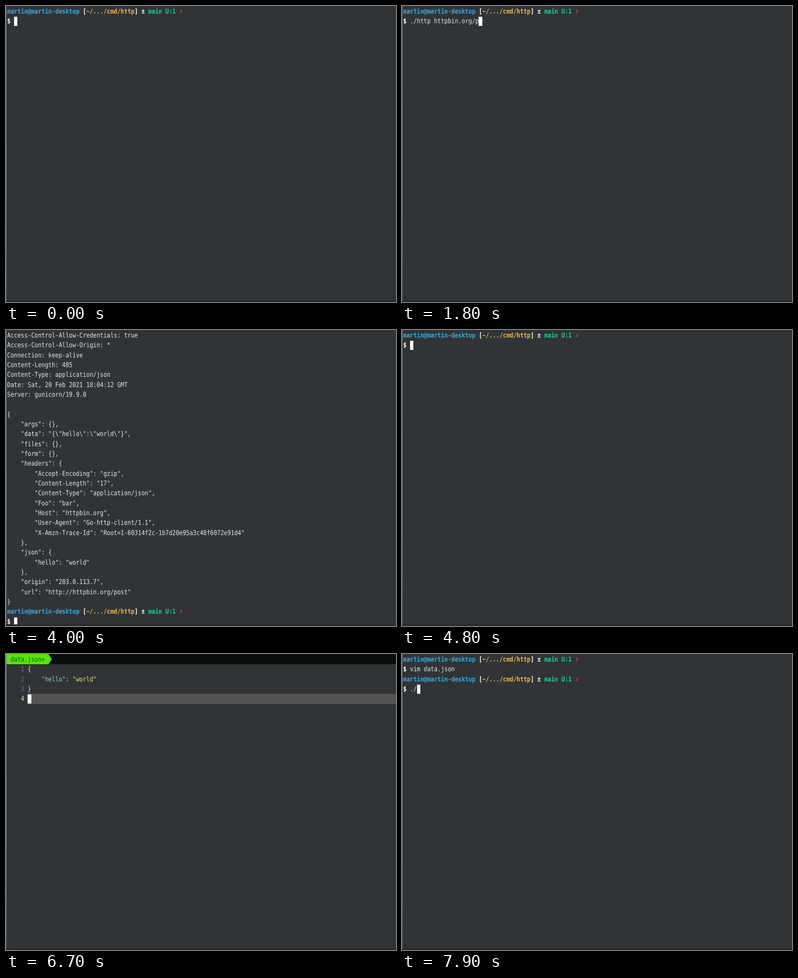
Recreate the animation shown at these times as an HTML page. Size 723 by 550 pixels, loop 8 s.

```html
<!DOCTYPE html>
<html lang="en">
<head>
<meta charset="utf-8">
<title>Terminal</title>
<style>
  html, body { margin: 0; width: 100%; height: 100%; overflow: hidden; background: #303437; }
  #stage { position: absolute; left: 0; top: 0; width: 723px; height: 550px; overflow: hidden; background: #303437; }
  #stage > * { position: absolute; }
  #edge { left: 0; top: 0; width: 1px; height: 550px; background: linear-gradient(#66767a, #74898a 60%, #5f686b); }
  #foot { left: 0; top: 547px; width: 723px; height: 3px; background: #25282b; }
  #bar { left: 0; top: 0; width: 723px; height: 19.3px; background: #0b0d0d; }
  #tab { left: 1px; top: 0; height: 19.3px; background: #5ae20c;
    clip-path: polygon(0 0, calc(100% - 6.4px) 0, 100% 50%, calc(100% - 6.4px) 100%, 0 100%); }
  #line { left: 40.3px; width: 683px; height: 18.33px; background: #545454; }
  #cursor { width: 6.4px; height: 17px; background: #fff; }
  /* cells are 6.38 x 18.33 px */
  #text { left: 2px; top: 1px; margin: 0; transform: scaleX(.848); transform-origin: 0 0;
    font: 12.5px/18.333px "DejaVu Sans Mono", monospace; white-space: pre; color: #e6e8e8;
    text-rendering: geometricPrecision; font-variant-ligatures: none; }
  b { color: #fff; }
  .user { color: #3ba9e0; }
  .path { color: #f2b548; }
  .git { color: #1fcf96; }
  .bad { color: #d8412f; }
  .tabname { color: #0c5a08; }
  .num { color: #6d6ca8; }
  .here { color: #eee67c; }
  .key { color: #84d2ea; }
  .str { color: #e8e08a; }
  .under { color: #303437; }
  .tilde { color: #454a4e; }
</style>
</head>
<body>
<div id="stage">
  <div id="bar"></div>
  <div id="tab"></div>
  <div id="line"></div>
  <div id="cursor"></div>
  <pre id="text"></pre>
  <div id="edge"></div>
  <div id="foot"></div>
</div>
<script>
const LOOP = 8000, CW = 6.38, RH = 550 / 30, ROWS = 30;
const el = id => document.getElementById(id);
const span = (cls, s) => `<span class="${cls}">${s}</span>`;
const bold = (cls, s) => `<b class="${cls}">${s}</b>`;

const prompt = bold("user", "martin@martin-desktop") + " <b>[</b>" + bold("path", "~/.../cmd/http") +
  "<b>] ±</b> " + bold("git", "main U:1") + " " + bold("bad", "✗");
const shell = s => "<b>$</b> " + s;

const post = "./http httpbin.org/post hello=world foo:bar";
const edit = "vim data.json";

// [time, characters typed]
const postKeys = [[0, 0], [200, 1], [400, 2], [500, 4], [600, 5], [700, 6], [800, 7], [900, 9],
  [1000, 11], [1100, 13], [1200, 15], [1500, 16], [1600, 17], [1700, 19], [1800, 20], [1900, 21],
  [2000, 23], [2200, 24], [2300, 26], [2400, 28], [2500, 29], [2600, 31], [2700, 33], [2800, 35],
  [3000, 36], [3100, 37], [3200, 39], [3300, 40], [3400, 41], [3500, 42], [3600, 43]];
const editKeys = [[0, 0], [5000, 1], [5100, 2], [5200, 3], [5300, 4], [5400, 5], [5500, 6],
  [5600, 7], [5700, 9], [5800, 10], [5900, 12], [6000, 13]];
const runKeys = [[0, 0], [7800, 1], [7900, 2]];
const typed = (keys, s, t) => s.slice(0, keys.filter(k => k[0] <= t).pop()[1]);

const reply = `HTTP/1.1 200 OK
Access-Control-Allow-Credentials: true
Access-Control-Allow-Origin: *
Connection: keep-alive
Content-Length: 485
Content-Type: application/json
Date: Sat, 20 Feb 2021 18:04:12 GMT
Server: gunicorn/19.9.0

{
    "args": {},
    "data": "{\\"hello\\":\\"world\\"}",
    "files": {},
    "form": {},
    "headers": {
        "Accept-Encoding": "gzip",
        "Content-Length": "17",
        "Content-Type": "application/json",
        "Foo": "bar",
        "Host": "httpbin.org",
        "User-Agent": "Go-http-client/1.1",
        "X-Amzn-Trace-Id": "Root=1-60314f2c-1b7d20e95a3c48f6072e91d4"
    },
    "json": {
        "hello": "world"
    },
    "origin": "203.0.113.7",
    "url": "http://httpbin.org/post"
}`.split("\n");

// Shell screen: earlier lines, then the prompt with the text being typed
function term(before, s) {
  const lines = [...before, prompt, shell(s)].slice(-ROWS);
  return { lines, row: lines.length - 1, col: 2 + s.length };
}

function vim(name, body, row) {
  const lines = [" " + span("tabname", name)];
  body.forEach((s, i) => lines.push("    " + span(i + 1 === row ? "here" : "num", i + 1) + " " + s));
  while (lines.length < ROWS) lines.push(span("tilde", "~"));
  return { lines, row, col: 6, tab: name.length + 3 };
}

const pair = "    " + span("key", '"hello"') + ": " + span("str", '"world"');

function screen(t) {
  if (t < 3800) return term([], typed(postKeys, post, t));
  if (t < 3900) return { lines: [prompt, shell(post)], row: 2, col: 0 };
  if (t < 4700) return term([prompt, shell(post), ...reply], "");
  if (t < 6300) return term([], typed(editKeys, edit, t));
  if (t < 6400) return { lines: [], row: 0, col: 0 };
  if (t < 6700) return vim("data.json", [""], 1);
  if (t < 6900) return vim("data.json+", ["{", pair, "}", ""], 4);
  if (t < 7400) return vim("data.json+", ["{", pair, span("under", "}")], 3);
  return term([prompt, shell(edit)], typed(runKeys, "./", t));
}

let last = -1;
function draw(t) {
  const step = Math.floor(t / 100);
  if (step === last) return;
  last = step;
  const s = screen(step * 100);
  el("text").innerHTML = s.lines.join("\n");
  el("cursor").style.left = 2 + s.col * CW + "px";
  el("cursor").style.top = 2 + s.row * RH + "px";
  for (const id of ["bar", "tab", "line"]) el(id).style.display = s.tab ? "block" : "none";
  if (s.tab) {
    el("tab").style.width = 1 + s.tab * CW + "px";
    el("line").style.top = 1 + s.row * RH + "px";
  }
}

const start = performance.now();
function tick() {
  draw((performance.now() - start) % LOOP);
  requestAnimationFrame(tick);
}
tick();
</script>
</body>
</html>
```
